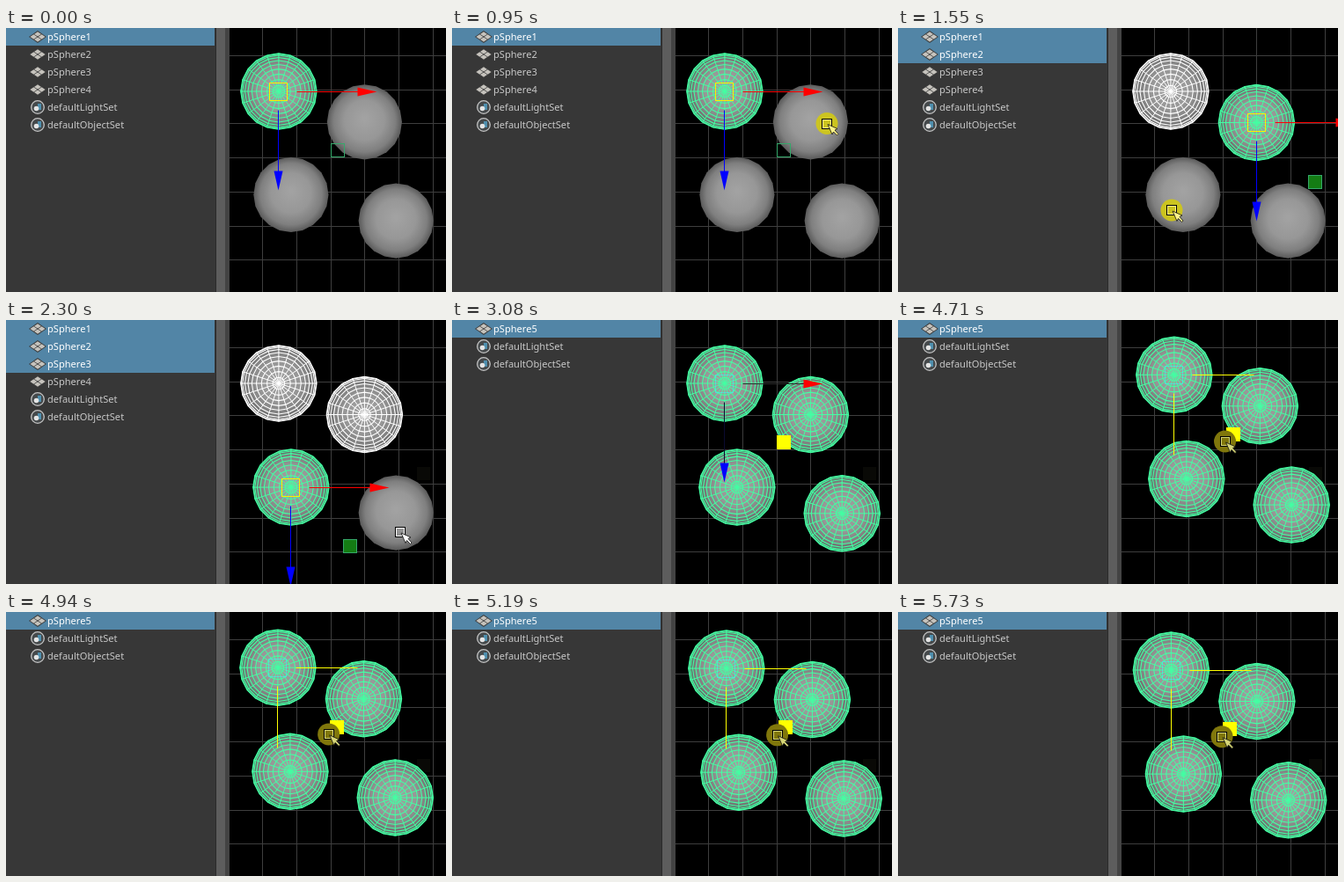
Recreate the animation shown at these times as an HTML page with a canvas. Size 500 by 300 pixels, loop 5.89 s.

```html
<!DOCTYPE html>
<html lang="en">
<head>
<meta charset="utf-8">
<title>Combine spheres</title>
<style>
  html, body { margin: 0; width: 100%; height: 100%; overflow: hidden; background: #000; }
  canvas { display: block; width: 500px; height: 300px; }
</style>
</head>
<body>
<canvas id="stage" width="500" height="300"></canvas>
<script>
const ctx = document.getElementById('stage').getContext('2d');
const LOOP = 5890, COMBINE = 3080, SHIFT = 3630, DRAG = 4710;
const GREEN = '#43ffa3', WHITE = '#ffffff', YELLOW = '#ffff00';
const RADIUS = 43.2;
const PLANE = { x: 67, y: 67.3 };
const spheres = [
  { x: 309.9, y: 72, selected: 0 },
  { x: 407.4, y: 107.5, selected: 1000 },
  { x: 323.9, y: 190.1, selected: 1700 },
  { x: 443.2, y: 219.8, selected: 2550 }
];

// Cursor stops: when it sets off, when it arrives, and where. It waits off stage.
const stops = [
  { from: 0, to: 0, x: 492, y: 316 },
  { from: 450, to: 870, x: 426, y: 108.5 },
  { from: 1070, to: 1470, x: 311, y: 207 },
  { from: 1850, to: 2150, x: 465, y: 261 },
  { from: 2225, to: 2300, x: 448, y: 241 },
  { from: 2700, to: 2780, x: 476, y: 258 },
  { from: COMBINE, to: COMBINE, x: 474, y: -30 },
  { from: SHIFT, to: 3860, x: 419, y: 105 },
  { from: 4010, to: 4240, x: 345, y: 157 },
  { from: 4410, to: 4480, x: 369, y: 146 }
];
const clicks = [[950, 1000], [1550, 1700], [2470, 2550], [4480, LOOP]];

const snap = v => Math.floor(v) + 0.5;

function rect(x, y, w, h, color) {
  ctx.fillStyle = color;
  ctx.fillRect(x, y, w, h);
}

function line(x1, y1, x2, y2, color, width = 1) {
  ctx.strokeStyle = color;
  ctx.lineWidth = width;
  ctx.beginPath();
  ctx.moveTo(x1, y1);
  ctx.lineTo(x2, y2);
  ctx.stroke();
}

function paint(fill, stroke, width) {
  if (fill) { ctx.fillStyle = fill; ctx.fill(); }
  if (stroke) { ctx.strokeStyle = stroke; ctx.lineWidth = width; ctx.stroke(); }
}

function poly(points, fill, stroke, width = 1) {
  ctx.beginPath();
  points.forEach(([x, y]) => ctx.lineTo(x, y));
  ctx.closePath();
  paint(fill, stroke, width);
}

function disc(x, y, r, fill, stroke, width = 1) {
  ctx.beginPath();
  ctx.arc(x, y, r, 0, Math.PI * 2);
  paint(fill, stroke, width);
}

function frameBox(x, y, size, color) {
  ctx.strokeStyle = color;
  ctx.lineWidth = 1;
  ctx.strokeRect(snap(x - size / 2), snap(y - size / 2), size, size);
}

function ring(cx, cy, r) {
  return Array.from({ length: 20 }, (_, i) => {
    const a = i * Math.PI / 10;
    return [cx + r * Math.cos(a), cy + r * Math.sin(a)];
  });
}

function drawSphere(x, y, wire) {
  const top = wire ? y : y - 0.7;
  const shade = ctx.createRadialGradient(x, top - 4, 2, x, top, RADIUS);
  shade.addColorStop(0, '#a2a2a2');
  shade.addColorStop(0.5, '#979797');
  shade.addColorStop(0.8, '#7f7f7f');
  shade.addColorStop(1, '#565656');
  poly(ring(x, top, 42.6), shade);
  if (!wire) return;
  for (let k = 1; k <= 10; k++) poly(ring(x, y, RADIUS * Math.sin(k * Math.PI / 20)), null, wire, 1.1);
  ring(x, y, RADIUS).forEach(([px, py]) => line(x, y, px, py, wire));
}

function drawGrid() {
  const pitch = 38.75;
  rect(254, 0, 246, 300, '#000');
  for (let x = 291.5; x < 500; x += pitch) line(snap(x), 0, snap(x), 300, '#3e3e3e');
  for (let y = 31.3; y < 300; y += pitch) line(254, snap(y), 500, snap(y), '#3e3e3e');
}

function meshIcon(y) {
  const tile = (cx, cy) => poly([[cx - 4, cy], [cx, cy - 2.7], [cx + 4, cy], [cx, cy + 2.7]], '#c6c3bd');
  poly([[26, y], [36, y - 7], [46, y], [36, y + 7]], '#3a3a3a');
  for (const side of [-1, 1]) {
    tile(36, y + 3.1 * side);
    tile(36 + 4.6 * side, y);
  }
}

function setIcon(y) {
  disc(36, y, 7.3, '#45494b', '#c4c4c4', 1.3);
  rect(36, y - 4, 4, 7, '#4f8fae');
  disc(34.5, y + 1.5, 2.8, '#e4e4e4');
}

function drawList(t) {
  rect(0, 0, 238, 300, '#373737');
  rect(238, 0, 1, 300, '#2b2b2b');
  rect(239, 0, 10, 300, '#5d5d5d');
  rect(249, 0, 5, 300, '#434343');
  const combined = t >= COMBINE;
  const meshes = combined ? ['pSphere5'] : spheres.map((_, i) => 'pSphere' + (i + 1));
  ctx.font = '11.1px "Noto Sans", "Open Sans", sans-serif';
  [...meshes, 'defaultLightSet', 'defaultObjectSet'].forEach((name, i) => {
    const y = i * 20 + 10, isMesh = i < meshes.length;
    const on = isMesh && t >= spheres[i].selected;
    if (on) rect(0, y - 10, 237, 20, '#5285a6');
    if (isMesh) meshIcon(y); else setIcon(y);
    ctx.fillStyle = on ? WHITE : '#c8c8c8';
    ctx.fillText(name, 47, y + 4);
  });
}

function stems(x, y, colorX, colorZ) {
  line(x + 21, y, x + 91, y, colorX);
  line(x, y + 21, x, y + 91, colorZ);
}

function arrowHeads(x, y) {
  poly([[x + 90, y - 5], [x + 112, y], [x + 90, y + 5]], '#ff0000');
  poly([[x - 5, y + 90], [x, y + 112], [x + 5, y + 90]], '#0000ff');
}

function drawHandle(px, py, t) {
  const x = snap(px), y = snap(py);
  const qx = Math.round(px + PLANE.x), qy = Math.round(py + PLANE.y);
  const combined = t >= COMBINE, dragging = t >= DRAG;
  if (dragging) stems(x, y, YELLOW, YELLOW);
  else if (combined) stems(x, y, '#2c2c2c', '#0a0a30');
  else stems(x, y, '#ff0000', '#0000ff');
  if (!dragging) arrowHeads(x, y);
  frameBox(x, y, 20, combined ? 'rgba(70,235,235,0.7)' : '#ffee00');

  if (combined) {
    rect(qx - 8, qy - 8, 16, 16, YELLOW);
  } else {
    if (t >= spheres[1].selected) rect(qx - 8, qy - 8, 16, 16, '#147c14');
    frameBox(qx, qy, 15, '#35a86a');
  }
}

function drawCursor(x, y, down, dark) {
  if (down) disc(x, y, 12.5, dark ? '#80770c' : 'rgba(208,199,24,0.93)');
  const light = down ? (dark ? '#d6d676' : '#fff48a') : WHITE;
  frameBox(x, y, 11, '#000');
  frameBox(x, y, 9, light);
  const arrow = [[1, 1], [12, 6], [9, 7.5], [13, 12], [11.5, 13.5], [7.5, 9.5], [6, 12.5]];
  poly(arrow.map(([ax, ay]) => [x + ax, y + ay]), light, '#111', 0.8);
}

function cursorAt(t) {
  const i = stops.filter(s => s.from <= t).length - 1;
  const b = stops[i], a = stops[i - 1] || b;
  const n = Math.round((b.to - b.from) / 70) + 1;
  const u = Math.min(1, (Math.floor((t - b.from) / 70) + 1) / n);
  return [a.x + (b.x - a.x) * u, a.y + (b.y - a.y) * u];
}

// The drag swings sideways and settles while drifting slowly down.
function offsetAt(t) {
  if (t < SHIFT) return [0, 0];
  if (t < DRAG) return [-2, 1.2];
  const k = Math.floor((t - DRAG) / 76.6);
  return [
    0.9 - 18 * Math.exp(-k / 4) * Math.cos((k - 1.69) * 1.03),
    -9.7 + 0.3 * k - 3 * Math.exp(-k / 5) * Math.sin(k * Math.PI / 3)
  ];
}

function draw(t) {
  const combined = t >= COMBINE;
  const [ox, oy] = offsetAt(t);
  const active = combined ? 0 : spheres.filter(s => s.selected <= t).length - 1;

  drawGrid();
  if (t >= spheres[2].selected) rect(467, 167, 15, 15, '#090906');
  spheres.forEach(({ x, y }, i) => {
    const wire = combined || i === active ? GREEN : i < active ? WHITE : null;
    drawSphere(x + ox, y + oy, wire);
  });
  const px = spheres[active].x + ox, py = spheres[active].y + oy;
  drawHandle(px, py, t);

  const [cx, cy] = t >= DRAG ? [px + 57.7, py + 75.7] : cursorAt(t);
  drawCursor(cx, cy, clicks.some(([a, b]) => t >= a && t < b), combined);
  drawList(t);
}

const start = performance.now();
function tick() {
  draw((performance.now() - start) % LOOP);
  requestAnimationFrame(tick);
}
tick();
</script>
</body>
</html>
```
